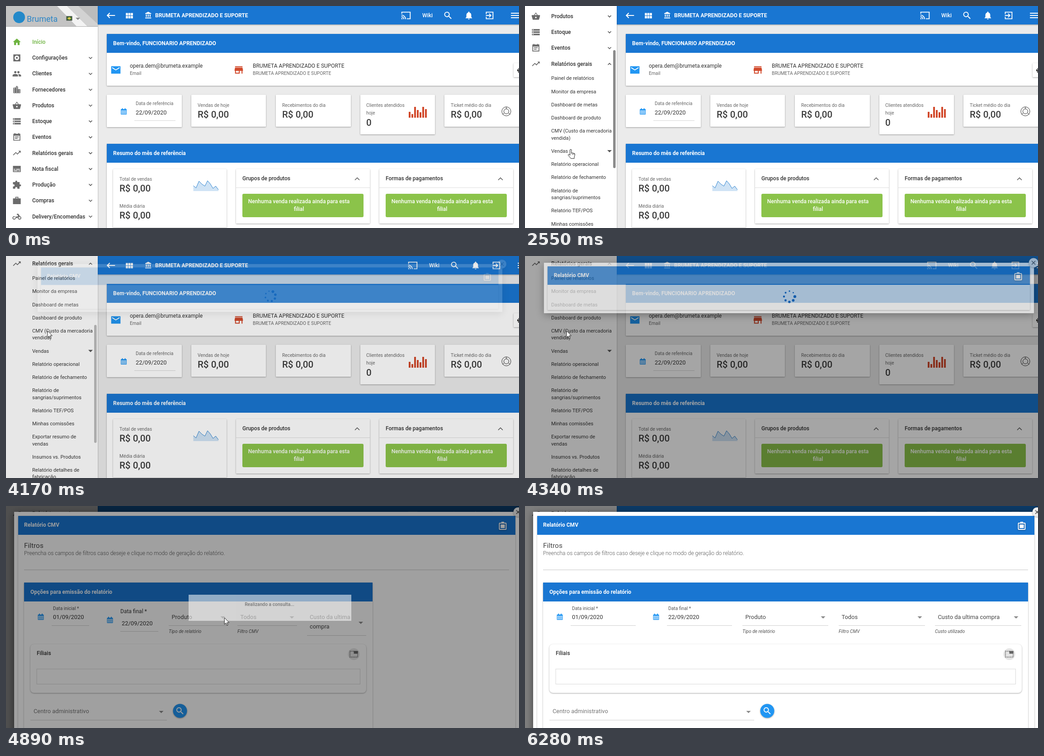
An HTML page that plays this animation: 1135 by 493 pixels, repeating every 6.45 s.

```html
<!DOCTYPE html>
<html lang="pt-BR">
<head>
<meta charset="utf-8">
<title>Relatório CMV</title>
<style>
html, body { margin: 0; width: 100%; height: 100%; overflow: hidden; background: #ebebeb; }
svg { display: block; font-family: Roboto, Arial, sans-serif; }
text { white-space: pre; }
.s { filter: drop-shadow(0 1px 1.5px rgba(0,0,0,.35)); }
.deep { filter: drop-shadow(0 4px 9px rgba(0,0,0,.5)); }
</style>
</head>
<body>
<svg id="stage" width="1135" height="493" viewBox="0 0 1135 493"></svg>
<script>
const LOOP = 6450, BLUE = '#1976d2', SKY = '#2196f3', DARK = '#333', GRAY = '#6b6b6b';
// Type sizes: the page is shown at 6/7 of its natural size
const [XS, SM, MD, LG, XL, XXL] = [12, 13, 14, 15, 18, 24].map(n => n * 6 / 7);

const text = (x, y, s, size = MD, fill = DARK, weight = 400, more = '') =>
  `<text x="${x}" y="${y}" font-size="${size}" fill="${fill}" font-weight="${weight}" ${more}>${s}</text>`;
const rect = (x, y, w, h, fill, more = '') =>
  `<rect x="${x}" y="${y}" width="${w}" height="${h}" fill="${fill}" ${more}/>`;
const card = (x, y, w, h, more = '') => rect(x, y, w, h, '#fff', `class="s" rx="1.5" ${more}`);
const path = (d, fill, more = '') => `<path d="${d}" fill="${fill}" fill-rule="evenodd" ${more}/>`;
const line = (d, stroke, width = 1) => path(d, 'none', `stroke="${stroke}" stroke-width="${width}"`);
const circle = (x, y, r, fill, more = '') => `<circle cx="${x}" cy="${y}" r="${r}" fill="${fill}" ${more}/>`;
const icon = (d, x, y, fill, k = 6 / 7) =>
  path(d, fill, `transform="translate(${x} ${y}) scale(${k}) translate(-12 -12)"`);
const caret = (x, y, fill = '#8a8a8a') => path(`M${x - 5} ${y - 2}h10l-5 5z`, fill);
const chevron = (x, y, dir, size = 3.5) =>
  line(`M${x - size} ${y - dir * size / 2}l${size} ${dir * size}l${size} ${-dir * size}`, '#555', 1.5);
const group = (id, body, more = '') => `<g id="${id}" ${more}>${body}</g>`;

const SEARCH = 'M9.5 3a6.5 6.5 0 1 0 4.2 11.4l.3.3v.8l5 5 1.5-1.5-5-5h-.8l-.3-.3A6.5 6.5 0 0 0 9.5 3zM9.5 5a4.5 4.5 0 1 1-.1 0z';
const TREND = 'M16 6l2.3 2.3-4.9 4.9-4-4L2 16.6 3.4 18l6-6 4 4 6.3-6.3L22 12V6z';

function calendar(x, y) {
  let grid = '';
  for (let i = 0; i < 12; i++) grid += rect(x - 5.4 + i % 4 * 2.9, y - 2 + (i >> 2) * 2.8, 2, 1.9, '#fff');
  return rect(x - 6.5, y - 5, 13, 12, SKY, 'rx="1"') + rect(x - 4, y - 7, 2, 3, SKY) + rect(x + 2, y - 7, 2, 3, SKY) + grid;
}

function sidebar() {
  const row = (label, d, i) => {
    const y = 80 + i * 35.23, home = !i;
    return icon(d, 24, y, home ? '#6db33f' : GRAY) + text(58, y + 4, label, MD, home ? '#6db33f' : DARK, 500) +
      (home || label == 'Relatórios gerais' ? '' : chevron(187, y, 1));
  };
  const top = [
    ['Início', 'M10 20v-6h4v6h5v-8h3L12 3 2 12h3v8z'],
    ['Configurações', 'M3 3h18v18H3zM12 6a6 6 0 1 0 .1 0zM12 9.500a2.500 2.500 0 1 0 .1 0z'],
    ['Clientes', 'M8 5a3 3 0 1 0 .1 0zM16 5a3 3 0 1 0 .1 0zM1 19v-2.5c0-5 14-5 14 0V19zM17 19v-2.5q0-2-2-3.4c3-.5 8 .4 8 3.4V19z'],
    ['Fornecedores', 'M15 11V5l-3-3-3 3v2H3v14h18V11zM5 9h2v2H5zm0 4h2v2H5zm0 4h2v2H5zM11 5h2v2h-2zm0 4h2v2h-2zm0 4h2v2h-2zm0 4h2v2h-2zm6-4h2v2h-2zm0 4h2v2h-2z'],
    ['Produtos', 'M2 9h5l5-7 5 7h5l1 1-3 11H4L1 10zM9 9h6l-3-4.4zM12 13a2 2 0 1 0 .1 0z'],
    ['Estoque', 'M2 4h20v4H2zm0 6h20v4H2zm0 6h20v4H2zM4 5h2v2H4zm0 6h2v2H4zm0 6h2v2H4z'],
    ['Eventos', 'M3 3h3V1h2v2h8V1h2v2h3v18H3zM5 8v11h14V8zM7 10h10v2H7zm0 4h7v2H7z'],
    ['Relatórios gerais', TREND]];
  const rest = [
    ['Nota fiscal', 'M2 4h20v16H2zM4 12h4v2H4zm6 0h10v2H10zM4 16h10v2H4zm12 0h4v2h-4z'],
    ['Produção', 'M20.5 11H19V5h-6V3.500a2.500 2.500 0 0 0-5 0V5H2v5.800h1.500a2.700 2.700 0 0 1 0 5.400H2V22h5.800v-1.500a2.700 2.700 0 0 1 5.400 0V22H19v-6h1.500a2.500 2.500 0 0 0 0-5z'],
    ['Compras', 'M2 6h6V2h8v4h6v15H2zM10 4v2h4V4z'],
    ['Delivery/Encomendas', 'M5 11a4.500 4.500 0 1 0 .1 0zm0 2a2.500 2.500 0 1 0 .1 0zM19 11a4.500 4.500 0 1 0 .1 0zm0 2a2.500 2.500 0 1 0 .1 0zM12 5h4l4 6h-3l-4 5H9l-3-4h8l1-4h-3z']];
  const subs = ['Painel de relatórios', 'Monitor da empresa', 'Dashboard de metas', 'Dashboard de produto',
    'CMV (Custo da mercadoria|vendida)', 'Vendas', 'Relatório operacional', 'Relatório de fechamento',
    'Relatório de|sangrias/suprimentos', 'Relatório TEF/POS', 'Minhas comissões', 'Exportar resumo de|vendas',
    'Insumos vs. Produtos', 'Relatório detalhes de|fabricação'];
  let y = 14.5, list = '';
  for (const s of subs) {
    const parts = s.split('|');
    parts.forEach((p, i) => list += text(58, y + 4 + i * 15.3, p, SM));
    if (s == 'Vendas') list += caret(187, y, '#555');
    y += 29.25 + (parts.length - 1) * 15.3;
  }
  const head = rect(0, 0, 203, 45, '#c3c3c3') + path('M113 0h22l45 45h-24z', '#f3f3f3') + path('M135 0h25l43 40v5h-23z', '#d2d2d2') +
    path('M160 0h43v40z', '#bcbcbc') + rect(0, 45, 203, 1, '#a9a9a9') +
    circle(29, 25, 13, '#2389c9') + text(46, 35, 'Brumeta', 18, '#2d86c6') +
    rect(134, 23, 12, 9, '#3c6b35', 'stroke="#444"') + path('M135.500 27.500l4.500-3 4.500 3-4.500 3z', '#d8c64a') + caret(159, 28);
  return rect(0, 0, 203, 493, '#fff', 'class="s"') +
    `<svg width="203" height="493">${group('scroll', head + top.map((r, i) => row(...r, i)).join('') +
      group('closed', chevron(187, 326.6, 1)) + group('opened', chevron(187, 327, -1)) +
      `<svg id="sub" y="344" width="203" height="0">${list}</svg>` +
      group('rest', rest.map((r, i) => row(...r, i + 8)).join('')))}</svg>` +
    rect(195, 0, 5.5, 486, '#8b8b8b', 'id="thumb" rx="2.7"');
}

function dashboard() {
  const nav = icon('M21 11H6.800l3.600-3.600L9 6l-6 6 6 6 1.400-1.400L6.800 13H21z', 232, 21, '#fff', 1.03) +
    icon('M4 5h5v6H4zm0 7h5v6H4zm6 0h5v6h-5zm6 0h5v6h-5zm-6-7h5v6h-5zm6 0h5v6h-5z', 272.500, 22, '#fff', .92) +
    icon('M4 10h3v7H4zm6 0h3v7h-3zM2 19h19v3H2zm14-9h3v7h-3zM11.500 1L2 6v2h19V6z', 315, 20.500, '#fff', .7) +
    text(330, 25, 'BRUMETA APRENDIZADO E SUPORTE', MD, '#fff', 700);
  const tools = icon('M1 8V3h22v18h-9v-2h7V5H3v3zM1 18v3h3a3 3 0 0 0-3-3zm0-4v2a5 5 0 0 1 5 5h2a7 7 0 0 0-7-7zm0-4v2a9 9 0 0 1 9 9h2A11 11 0 0 0 1 10z', 885, 21, '#fff', .93) +
    text(921, 25, 'Wiki', MD, '#fff', 500) + icon(SEARCH, 978, 21, '#fff', .93) +
    icon('M12 22a2 2 0 0 0 2-2h-4a2 2 0 0 0 2 2zM18 16v-5q0-5-4.500-6.300V4a1.500 1.500 0 0 0-3 0v.7Q6 6 6 11v5l-2 2v1h16v-1z', 1024, 21, '#fff', .9) +
    icon('M10 15.600l1.500 1.400 5-5-5-5L10 8.400l2.700 2.600H3v2h9.700zM3 9V3h18v18H3v-6h2v4h14V5H5v4z', 1070, 21, '#fff', .93) +
    icon('M3 16h24v2H3zm0-5h24v2H3zm0-5h24v2H3z', 1126, 21, '#fff', .98);

  const welcome = card(223, 62, 920, 115) + rect(223, 62, 912, 42, BLUE) +
    text(237, 87, 'Bem-vindo, FUNCIONARIO APRENDIZADO', MD, '#fff', 700) +
    icon('M2 4h20v16H2zM4 6l8 5 8-5v2l-8 5-8-5z', 243, 142, SKY, 1.03) +
    text(274, 137, 'opera.dem@brumeta.example') + text(274, 153, 'Email', XS, '#666') +
    icon('M4 4h16v2H4zM4 7h16l1 5v2h-1v6h-2v-6h-4v6H4v-6H3v-2zM6 14v4h6v-4z', 515, 142, '#d24a2c', 1.03) +
    text(546, 137, 'BRUMETA APRENDIZADO E SUPORTE') +
    text(546, 153, 'BRUMETA APRENDIZADO E SUPORTE', XS, '#666') +
    card(1123, 127, 20, 31, 'rx="3"') + circle(1136, 143, 3, 'none', 'stroke="#222" stroke-width="4" stroke-dasharray="3 1"');

  const money = (x, y, label) => text(x, y, label, XS, '#666') + text(x, y + 24, 'R$ 0,00', XXL, '#3c3c3c', 500);
  const bars = [13, 8, 24, 17, 12, 24, 19].map((h, i) => rect(891 + i * 6, 248 - h, 4, h, '#d24a2c')).join('');
  const tiles = card(223, 197, 166, 72) + calendar(260.500, 234) + text(287, 220, 'Data de referência', XS, '#666') +
    text(287, 241, '22/09/2020', LG) + rect(284, 254, 91, 1, '#d5d5d5') +
    card(410, 197, 165, 71) + money(424, 224, 'Vendas de hoje') +
    card(597, 197, 166, 71) + money(611, 224, 'Recebimentos do dia') +
    card(784, 197, 165, 88) + text(797, 224, 'Clientes atendidos', XS, '#666') + text(797, 241, 'hoje', XS, '#666') +
    text(797, 265.500, '0', XXL, '#3c3c3c', 500) + bars +
    card(970, 197, 180, 71) + money(984, 224, 'Ticket médio do dia') +
    circle(1107, 234, 10, 'none', 'stroke="#333"') + circle(1107, 234, 5.500, 'none', 'stroke="#333"') +
    line('M1107 224v4.500M1102.500 237.500l-4 3M1111.500 237.500l4 3', DARK);

  const notice = (x, label) => card(x, 362, 296, 121) + rect(x, 403, 296, 1, '#ddd') + text(x + 14, 387, label, MD, DARK, 500) +
    chevron(x + 268, 384, -1, 5) + rect(x + 14, 417, 268, 52, '#8bc34a', 'rx="3"') +
    text(x + 139, 438, 'Nenhuma venda realizada ainda para esta', MD, '#fff', 500, 'text-anchor="middle"') +
    text(x + 139, 455, 'filial', MD, '#fff', 500, 'text-anchor="middle"');
  const spark = 'M414.500 399l6 5 6.500-15 7 7 6 4 6-12 6 7 6 10 6-5 6 8';
  const summary = card(223, 306, 920, 200) + rect(223, 306, 912, 42, BLUE) +
    text(237, 331, 'Resumo do mês de referência', MD, '#fff', 700) +
    card(237, 362, 251, 130) + money(251, 388, 'Total de vendas') + money(251, 448, 'Média diária') +
    path(spark + 'V411H414.500z', '#cfe3f5') + line(spark, '#2b82cf') +
    notice(509, 'Grupos de produtos') + notice(826, 'Formas de pagamentos');

  return rect(203, 0, 932, 493, '#ebebeb') + welcome + tiles + summary +
    rect(203, 0, 940, 41, BLUE, 'class="s"') + nav + group('tools', tools);
}

const closeButton = (x, y) => circle(x, y, 10.500, '#eee', 'class="s"') +
  line(`M${x - 4} ${y - 4}l8 8m0-8l-8 8`, '#555', 1.6);
const clipboard = (x, y) => rect(x - 7.500, y - 6, 15, 14, 'none', 'stroke="#fff" stroke-width="2" rx="1" class="s"') +
  rect(x - 3, y - 9, 6, 3, '#fff') + rect(x - 4.500, y - 3, 9, 8, '#fff');

function loader() {
  let dots = '';
  for (let i = 0; i < 8; i++) {
    const a = i * Math.PI / 4;
    dots += circle(12 * Math.cos(a), 12 * Math.sin(a), 3.2 - i * .25, '#1565c0');
  }
  return rect(42, 15, 1084, 112, '#fff', 'class="deep"') + card(50, 23, 1067, 97) + rect(50, 23, 1067, 41, BLUE) +
    text(64, 47, 'Relatório CMV', MD, '#fff', 700) + clipboard(1091, 45) + group('spinner', dots) + closeButton(1125, 15);
}

function form(wide) {
  const right = wide ? 1113 : 811, mid = wide ? 507 : 356;
  const under = (x, w, y = 265) => rect(x, y, w, 1, '#cfcfcf');
  const select = (x, w, label, hint) => under(x, w) + text(x + 6.5, 251, label, LG, '#444') + caret(x + w - 11.5, 247) +
    text(x, 282, hint, XS, '#555', 400, 'font-style="italic"');
  const fields = calendar(77, 246) + text(104, 231, 'Data inicial *', XS, '#555') + text(104, 251, '01/09/2020', LG) + (wide
    ? under(101, 144) + calendar(290, 246) + text(317, 231, 'Data final *', XS, '#555') + text(317, 251, '22/09/2020', LG) + under(314, 144) +
      select(481, 190, 'Produto', 'Tipo de relatório') + select(694, 191, 'Todos', 'Filtro CMV') +
      select(907, 191, 'Custo da ultima compra', 'Custo utilizado')
    : under(101, 83) + calendar(230, 253) + text(253, 238, 'Data final *') + text(256, 265, '22/09/2020', LG) + under(253, 84, 278) +
      select(360, 131, 'Produto', 'Tipo de relatório') + select(512, 132, 'Todos', 'Filtro CMV') +
      text(672, 251, 'Custo da ultima', LG, '#444') + text(672, 272, 'compra', LG, '#444') + caret(785, 259) + under(666, 131, 287));
  const x = right - 41.5;
  return card(40, 170, right - 40, 340) + rect(40, 170, right - 40, 42, BLUE) +
    text(54, 195, 'Opções para emissão do relatório', MD, '#fff', 700) + fields +
    card(54, 307, right - 68, 108, 'style="rx:8px"') + text(68, 331, 'Filiais', MD, DARK, 500) +
    circle(x, 329, 13, '#e4e4e4') + rect(x - 8.5, 322.5, 17, 13, 'none', 'stroke="#555" stroke-width="1.5" stroke-dasharray="2 1.5"') +
    rect(x, 322, 9, 6, '#666') + rect(68, 362, right - 95.5, 33.5, '#fff', 'stroke="#d9d9d9"') +
    text(61, 460, 'Centro administrativo', LG, '#757575') + under(54, mid - 54, 475) + caret(mid - 12.5, 457) +
    circle(mid + 29, 455, 15.5, SKY, 'class="s"') + icon(SEARCH, mid + 29, 455, '#fff', .9);
}

const report = () => rect(18, 13, 1118, 520, '#fff', 'class="deep"') + card(27, 22, 1100, 500) + rect(27, 22, 1100, 42, BLUE) +
  text(40, 46, 'Relatório CMV', MD, '#fff', 700) + clipboard(1099, 44) +
  text(40, 93, 'Filtros', XL, '#444') +
  text(40, 109, 'Preencha os campos de filtros caso deseje e clique no modo de geração do relatório.', MD, '#555', 300) +
  rect(40, 141, 1073, 1.5, '#d8d8d8') + group('narrow', form(false)) + group('wide', form(true)) + closeButton(1133, 13.5);

const $ = id => document.getElementById(id);
$('stage').innerHTML = dashboard() + sidebar() + rect(0, 0, 1135, 493, '#000', 'id="scrim"') +
  group('loader', loader()) + group('report', report()) + rect(0, 0, 1135, 493, '#000', 'id="veil"') +
  group('toast', rect(404, 197, 360, 58, '#fff') + text(583, 222, 'Realizando a consulta...', XS, '#555', 500, 'text-anchor="middle"')) +
  circle(90.5, 165.5, 9.5, '#9993', 'id="click" stroke="#9998"') +
  group('cursor',
    group('arrow', path('M0 0v15l3.400-3.200 2.300 5.400 2.200-1-2.300-5.100h4.700z', '#fff', 'stroke="#222"')) +
    group('hand', path('M4.500 2a1.700 1.700 0 0 1 3.400 0v6l5.600 1.200q2 .5 2 2.500l-1.500 6v3H6.500l-6-7.500q0-2.400 2.200-1.600l1.800 1.900z', '#fff', 'stroke="#222" transform="translate(-6)"') +
      line('M2 10V7.800M4.500 12.500V10M7.300 12V9', '#222')));

const set = (id, attrs) => { for (const k in attrs) $(id).setAttribute(k, attrs[k]); };
const show = (id, on) => set(id, { display: on ? 'inline' : 'none' });
const ease = p => p * p * (3 - 2 * p);
const span = (t, a, b) => Math.min(1, Math.max(0, (t - a) / (b - a)));
// Values at time t between keys of the form [time, ...values]
function at(t, ...keys) {
  const i = keys.findIndex(k => k[0] > t);
  if (i < 1) return keys.at(i).slice(1);
  const [a, b] = [keys[i - 1], keys[i]], p = span(t, a[0], b[0]);
  return a.slice(1).map((v, j) => v + (b[j + 1] - v) * p);
}

function draw(t) {
  const open = ease(span(t, 1620, 2080)), scroll = ease(span(t, 2230, 2770)), grown = open * 475;
  set('sub', { height: grown });
  set('rest', { transform: `translate(0 ${grown})` });
  set('scroll', { transform: `translate(0 ${-309.5 * scroll})` });
  show('closed', t < 1620);
  show('opened', t >= 1620);
  set('thumb', { y: 153 * scroll, height: 486 - 224 * open, opacity: span(t, 450, 600) - span(t, 4110, 4250) });

  set('tools', { transform: `translate(${t < 4110 ? 0 : 15})` });
  set('scrim', { opacity: at(t, [4110, 0], [4340, .35], [4480, .5])[0] });
  const [fade, zoom] = at(t, [4110, 0, .93], [4340, .62, 1], [4480, 1, 1.03]);
  show('loader', t >= 4110 && t < 4480);
  set('loader', { opacity: fade, transform: `translate(584 71) scale(${zoom}) translate(-584 -71)` });
  set('spinner', { transform: `translate(585 90) rotate(${(t - 4340) * .36})` });
  show('report', t >= 4480);
  show('narrow', t < 4900);
  show('wide', t >= 4900);
  const [veil, toast] = at(t, [4620, 0, 0], [4720, .35, .3], [4820, .4, .6], [4950, .35, .5], [5090, 0, 0]);
  set('veil', { opacity: veil });
  set('toast', { opacity: toast });

  show('click', t >= 3800 && t < 3890);
  const [x, y] = at(t, [70, 556, 478], [250, 320, 400], [430, 130, 300], [520, 40, 230], [660, 121, 155], [780, 121, 155],
    [1370, 93, 311], [1470, 101, 318], [2940, 101, 318], [3310, 95, 162], [3470, 95, 162], [3630, 91, 165],
    [4110, 92, 166], [4400, 92, 166], [4720, 373, 213], [4820, 420, 230], [5150, 714, 313], [5420, 797, 314],
    [5510, 797, 314], [5800, 960, 390], [6050, 1098, 493], [6200, 1098, 493], [6201, 1128, 23]);
  const hand = t >= 460 && t < 4110;
  show('hand', hand);
  show('arrow', !hand);
  show('cursor', t >= 70 && t < 6050 || t >= 6210 && t < 6280);
  set('cursor', { transform: `translate(${x} ${y})` });
}

const start = performance.now();
function tick() {
  draw((performance.now() - start) % LOOP);
  requestAnimationFrame(tick);
}
tick();
</script>
</body>
</html>
```
